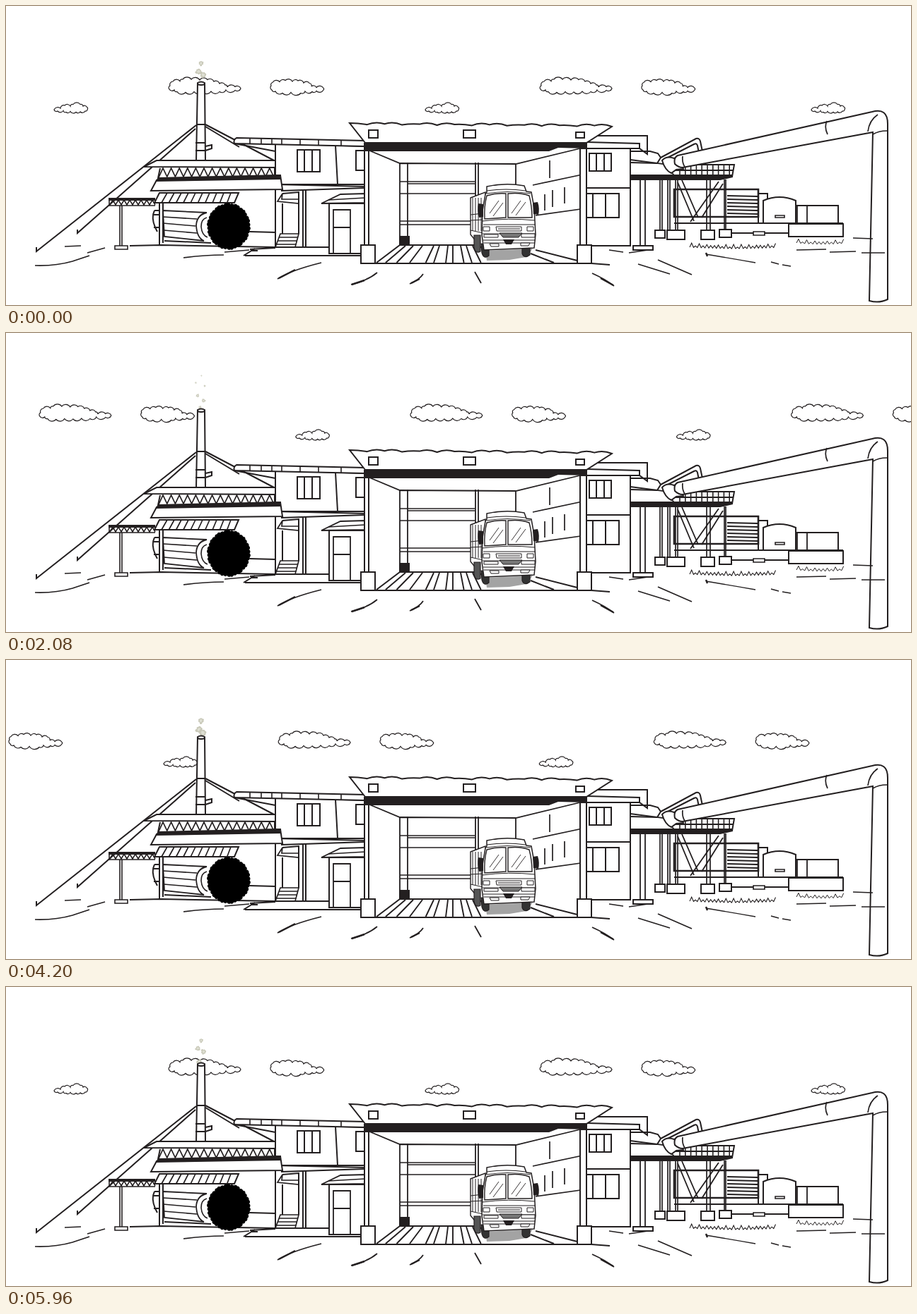
These frames come from a looping animation (1280x424 px, 6 s). An HTML page:

```html
<!DOCTYPE html>
<html lang="en">
<head>
<meta charset="utf-8">
<title>Factory yard</title>
<style>
html, body { margin: 0; width: 100%; height: 100%; overflow: hidden; background: #fff; }
svg { display: block; width: 1280px; height: 424px; }
</style>
</head>
<body>
<svg id="stage" viewBox="0 0 1280 424"></svg>
<script>
const INK = '#231f20', NS = 'http://www.w3.org/2000/svg';
const stage = document.getElementById('stage');

function add(tag, attrs, parent = stage) {
  const el = document.createElementNS(NS, tag);
  for (const k in attrs) el.setAttribute(k, attrs[k]);
  parent.appendChild(el);
  return el;
}
const draw = (d, fill, w, parent) =>
  add('path', { d, fill, stroke: INK, 'stroke-width': w }, parent);
const line = (d, w = 2) => draw(d, 'none', w);
const shape = (d, w = 2) => draw(d + 'Z', '#fff', w);
const solid = d => add('path', { d: d + 'Z', fill: INK });
const box = (x, y, w, h, sw = 2) => shape(`M${x} ${y}h${w}v${h}h${-w}`, sw);
const bars = (xs, y1, y2, w) => line(xs.map(x => `M${x} ${y1}V${y2}`).join(''), w);
const repeat = (n, f) => Array.from({ length: n }, (_, i) => f(i));
const mix = (a, b, k) => a + (b - a) * k;

// Closed outline of outward bumps through the given points
function bumps(pts) {
  let d = `M${pts[0]}`;
  for (let i = 1; i <= pts.length; i++) {
    const a = pts[i - 1], b = pts[i % pts.length];
    const r = (Math.hypot(b[0] - a[0], b[1] - a[1]) * 0.62).toFixed(2);
    d += `A${r} ${r} 0 0 1 ${b}`;
  }
  return d + 'Z';
}
const cloud = s => bumps(s.split(' ').map(p => p.split(',').map(Number)));

// Clouds
const small = cloud('1,147 10,145 16,141 24,142 28,139.5 38,139.5 42,142 47,143 48,147 45,149 38,150 32,150.5 24,149.5 18,150.5 14,148.5 6,149');
const wide = cloud('165,113 169,107 179,106.5 183,104 195,104 207,105 218,104.5 227,107 235,110 243,112 246,115 257,114.5 265,117 257,119.5 244,119 235,121.5 223,121 211,122 199,121.5 187,122.5 175,121.5 171,119 164,118');
const round = cloud('308,113 310,108.5 320,107.5 328,105.5 338,107 346,106 354,109 362,109.5 365,114 372,115.5 382,116.5 382,119 372,120.5 366,121.5 356,121 350,123.5 336,122.5 324,123.5 314,121 309,119');
const cloudRuns = [[67, -458], [592, 67], [1138, 592], [1663, 1138]];
const clouds = cloudRuns.map(() => {
  const g = add('g', {});
  [small, wide, round].forEach(d => draw(d, '#fff', 1.2, g));
  return g;
});

// Smoke puffs: life in cycle ms, x, y and scale from birth to end, rise curve
const CYCLE = 1450;
const puffs = [
  { life: [-430, 980], x: [275.5, 276.5], y: [103, 56], s: [1.3, .1], curve: 1 },
  { life: [-160, 1060], x: [274, 267], y: [109, 63], s: [1.3, .05], curve: .9 },
  { life: [-120, 1100], x: [277, 282], y: [110, 66], s: [1.3, .05], curve: .95 },
  { life: [230, 1500], x: [274, 268], y: [109, 58], s: [.9, .06], curve: 1.25 },
  { life: [420, 1500], x: [279, 281], y: [109, 62], s: [.9, .06], curve: 1.35 },
  { life: [780, 1440], x: [275, 270], y: [109, 72], s: [.5, .04], curve: 1 }
];
const puffEls = puffs.map((_, i) => {
  const g = add('g', {});
  const inner = add('g', { transform: `rotate(${i * 67})` }, g);
  add('path', { d: 'M-4-1Q-5-4-2-4Q0-6 2-4Q6-4 4-1Q5 2 2 2Q2 5-1 5Q-3 4-2 2Q-5 2-4-1Z', fill: '#c9c9b9' }, inner);
  add('path', { d: 'M-2-2Q0-4 2-2Q2 1 0 2Q-3 1-2-2Z', fill: '#dedfd3' }, inner);
  return g;
});

// Chimney and stays
line('M269 169L43 348V342M268 174L101 322V317M282 168L379 219M282 171L330 200');
shape('M271 109L269 220H282L281 109Q276 106 271 109');
line('M271 111Q276 113 281 111M269 168H282M268 194H282M268 205H282M282 199L291 197V202L282 205');

// Walkway on the left
line('M161 283V341M164 283V341', 1.6);
box(154, 340, 18, 5, 1.6);
solid('M145 272H211V276H145');
line('M146 273V283H211M147 282' + repeat(16, i => `L${151 + i * 4} ${i % 2 ? 282 : 275}`).join(''), 1.6);

// Gutter pipe and upper block
shape('M381 195L508 199V256L381 253');
shape('M326 187L508 191V199L323 195Q321 190 326 187');
bars([345, 361, 376, 390], 188, 196, 1.6);
bars([416, 442, 474], 190, 198, 1.6);
line('M323 195L381 206M466 198L469 253');
box(412, 204, 32, 31);
bars([422, 433], 204, 235);
box(495, 205, 13, 28);

// Left shed
line('M381 260V342M389 262L508 258M389 253L508 253');
shape('M213 219H381V229L195 228');
line('M218 230L215 244M380 229V241');
line('M216 243' + repeat(28, i => `L${222 + i * 5.8} ${i % 2 ? 242 : 230}`).join(''), 1.7);
shape('M213 247L205 262L391 260L388 240');
solid('M215 243L389 239V246L211 249');
shape('M217 265H329L323 279H210');
line(repeat(10, i => `M${228 + i * 10} 265L${220 + i * 10.3} 279`).join(''), 1.7);

// Tanks
line('M210 290Q205 300 211 314L214 320M210 290H217M209 296H216M209 314H217');
shape('M222 290L284 293Q270 296 269 311Q270 329 280 333L224 327', 1.8);
line('M222 299L270 302M222 308L268 312M223 318L270 322M284 300Q276 302 276 313Q277 325 285 328', 1.6);
line('M217 279V340M222 279V336M224 333L290 336M345 320L381 321');
line('M175 340L220 339L382 342M345 345L381 343');

// Stairs, porch and hut
shape('M391 266L384 277L414 280V274L390 274', 1.7);
line('M391 266L414 264V323M391 280V323');
shape('M388 323H414L409 342H381', 1.7);
line('M386 328H413M384 333H412M383 338H410', 1.7);
line('M420 262V342M424 261V342M382 342H457M336 354L352 344M346 347H356M338 354H503');
shape('M457 280H508V351H457');
shape('M446 280L473 267L508 266V279', 1.8);
line('M456 275L508 272', 1.6);
line('M463 351V289H487V351M463 314H487', 1.8);

// Bush
const leaf = repeat(38, i => {
  const a = i / 38 * Math.PI * 2, r = 1 + .025 * Math.sin(i * 2.3);
  return [(315 + 29.5 * r * Math.cos(a)).toFixed(1), (312.5 + 32 * r * Math.sin(a)).toFixed(1)];
});
add('path', { d: bumps(leaf), fill: '#000' });

// Right block
shape('M821 184H907V210L896 202H821');
line('M821 193L896 195V202');
shape('M821 202H883V340H821');
line('M821 258H883');
box(825, 209, 31, 25);
bars([835, 846], 209, 234);
box(819, 266, 48, 34);
bars([830, 848], 266, 300);

// Hall interior
shape('M508 200H821V365H508');
line('M514 205L557 223L721 224L812 202M557 223V339M568 222V327M721 224V256', 1.8);
line('M557 249H663M568 252H663M557 266H663M557 305H663M557 310H663', 1.7);
bars([664, 668], 222, 339, 1.8);
line('M745 254L820 238M749 297L820 287M769 219V244M762 267V290M773 261V285M790 257V280', 1.7);
solid('M556 326H571V340H556');
line('M524 364L557 339H664M502 365H828L854 367');
const planks = [565, 576, 589, 605, 613, 625, 632, 643, 651, 660];
line(planks.map(x => `M${x} 340L${632 + (x - 632) * 1.42} 364`).join(''), 1.9);
line('M749 346L808 361M742 351L775 364', 1.9);

// Hall frame and roof
shape('M507 204H513V340H507');
shape('M812 202H821V340H812');
box(502, 339, 20, 26);
box(808, 339, 20, 26);
let roof = 'M508 194L486 166';
for (let i = 0; i < 15; i++) {
  const x = 486 + i * 24.73, y = 167 + i * .2;
  roof += `Q${x + 12} ${y - (i % 3 ? 4 : 1)} ${x + 24.73} ${y + (i % 2 ? 0 : 1.2)}`;
}
shape(roof + 'L821 194');
solid('M506 194H821V202L781 201L768 206H506');
box(513, 176, 13, 11);
box(647, 176, 17, 11);
box(806, 179, 12, 8);

// Truck
add('path', { d: 'M678 347L745 344L736 356L712 360L680 361Z', fill: '#a3a3a3' });
shape('M657 272L678 264V350L657 324', 1.4);
bars([660, 664, 668, 672], 272, 319, 1);
line('M657 296L675 294M657 304L675 303M657 318L675 322', 1);
draw('M662 325H671V348Q664 352 662 342Z', '#555', 1.2);
draw('M672 337H683V354Q676 360 673 350Z', '#333', 1.2);
draw('M730 342H741V353Q733 359 730 351Z', '#333', 1.2);
shape('M680 264V256Q707 250 733 255L736 263L743 264L747 286L749 324L747 343L676 346L673 324L674 290L678 267', 1.5);
line('M680 262Q707 258 735 262M680 266Q708 261 742 266', 1.1);
shape('M680 269Q693 265 707 266V300L677 302Q676 284 680 269', 1.4);
shape('M710 266Q728 264 740 269Q744 284 744 300L710 300', 1.4);
line('M684 294L697 276M689 298L703 279M715 294L728 276M721 297L735 278', .9);
line('M674 305Q710 300 748 304M675 310H748M674 323H749M675 332H749M676 336H748', 1);
shape('M693 313H729V319H694', 1);
line('M696 316H727', 1);
box(675, 313, 9, 6, 1);
box(737, 313, 9, 6, 1);
box(676, 324, 20, 4, 1);
box(729, 323, 19, 5, 1);
draw('M698 322H730L725 328H703Z', '#777', 1);
solid('M703 331H719L715 338H707');
shape('M684 337H697V341H686', 1);
shape('M728 336H741L739 340H728', 1);
solid('M668 280L675 281V299L669 300Q666 290 668 280');
solid('M745 279L752 278Q755 287 753 296L746 295');

// Plant on the right
shape('M945 260H1064V299H945', 2.6);
line(repeat(6, i => `M1020 ${269 + i * 5}L1063 ${270 + i * 5}`).join(''), 1.9);
line('M1064 266H1077V274M945 308H1184M952 299H1064V308');
shape('M1071 308V276Q1094 266 1117 276V308');
box(1088, 297, 13, 3, 1.6);
box(1117, 283, 60, 25);
line('M1133 283V308M1119 283V308', 1.8);
box(1107, 309, 77, 18);
line('M1026 322H1107');
box(1057, 320, 16, 5, 1.7);
line('M950 250L973 305M956 247L979 300M1008 249L968 306M1014 252L984 300', 1.8);
bars([897, 904], 246, 340, 1.8);
bars([925, 928, 936, 939, 947, 950, 991, 996, 1016, 1018], 246, 318, 1.7);
box(918, 318, 14, 11);
box(935, 318, 25, 13);
box(983, 318, 19, 13);
box(1009, 317, 17, 11);
box(887, 340, 28, 6);
shape('M883 218L930 224L945 240H883', 1.8);
line('M945 225H1030L1027 242M940 233H1029');
bars(repeat(10, i => 953 + i * 7.8), 225, 241, 1.6);
solid('M883 239H1028V243L1010 247H883');

// Duct and big pipe
line('M883 206L911 206L922 209L926 215L921 223L884 222');
line('M926 215L976 188Q981 187 982 192L985 206M930 218L973 196Q977 194 978 198L980 208');
shape('M928 219Q934 212 945 216L953 213L958 231L948 232L941 237Q932 233 928 219');
shape('M950 212L1225 150Q1247 144 1247 167V416Q1235 422 1221 418L1226 179L957 229Q951 229 946 224Q944 215 950 212');
line('M957 213Q956 222 960 228M1161 163Q1157 172 1162 182M1219 178Q1221 162 1233 154M1226 182Q1234 177 1246 177', 1.7);

// Ground marks
line('M41 368Q70 369 94 362L118 354M83 341L106 340M115 350L140 343M251 357Q280 353 308 353M309 349L344 346', 1.7);
line('M384 387Q402 375 446 364M488 395Q512 389 525 378M571 394Q585 388 590 380M663 377L672 393', 1.8);
line('M829 379Q847 387 860 397M894 366L939 380M922 360L970 381M853 346L873 349M881 350L908 346', 1.7);
line('M990 352Q1026 358 1060 364M1082 363L1093 366M1098 367L1110 369', 1.3);
line('M1118 346L1160 345M1165 349L1202 348M1198 329L1226 330M1210 350L1243 350', 1.5);
line('M386 386L409 374M489 395L507 389M573 393L585 387M841 386L859 396M990 350L992 355', 2.4);
const grass = (x, y, n, s) => 'M' + repeat(n, i =>
  `${(x + i * s).toFixed(1)} ${(y + Math.sin(i / n * 3) * 2 + (i % 2 ? -3 - 2 * Math.sin(i * 1.7) : 1)).toFixed(1)}`).join('L');
line(grass(967, 341, 46, 2.7), 1.1);
line(grass(1118, 335, 24, 2.9), 1);

// Motion
function placePuff(el, puff, phase) {
  const [from, to] = puff.life;
  const p = [phase, phase - CYCLE, phase + CYCLE].find(v => v >= from && v <= to);
  if (p === undefined) { el.setAttribute('display', 'none'); return; }
  const u = (p - from) / (to - from);
  el.removeAttribute('display');
  el.setAttribute('transform',
    `translate(${mix(...puff.x, u)} ${mix(...puff.y, u ** puff.curve)}) scale(${mix(...puff.s, u)})`);
}
function render(ms) {
  const t = Math.floor(ms % 6000 / 40) * 40;
  clouds.forEach((g, i) =>
    g.setAttribute('transform', `translate(${mix(...cloudRuns[i], t / 5960)} 0)`));
  const phase = (t + 210) % CYCLE;
  puffEls.forEach((el, i) => placePuff(el, puffs[i], phase));
}
const start = performance.now();
function tick() {
  render(Math.max(0, performance.now() - start));
  requestAnimationFrame(tick);
}
tick();
</script>
</body>
</html>
```
